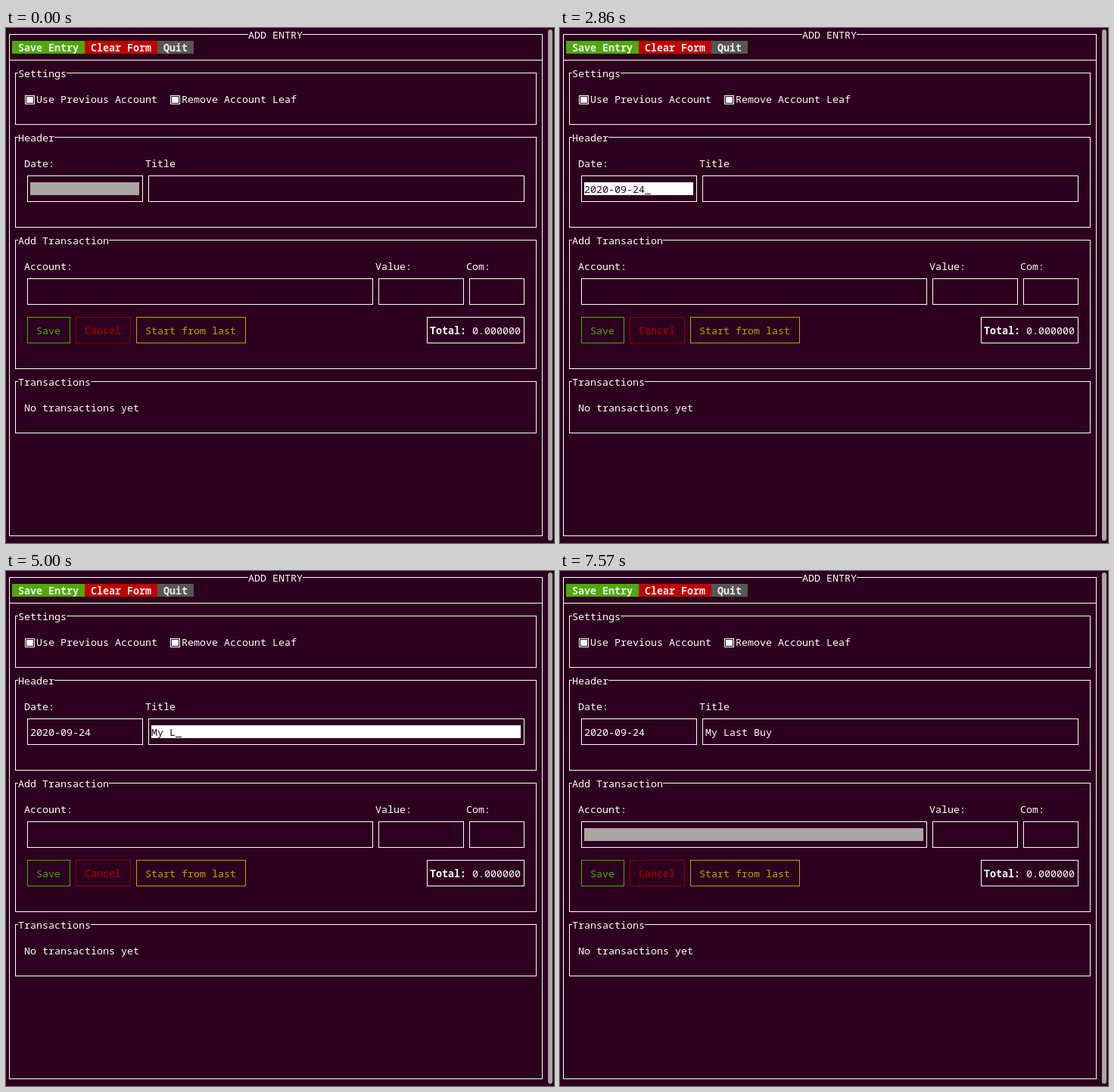
Animation, 724 px wide and 681 px high, one loop 8000 ms. Source, as an HTML page with a canvas:

```html
<!DOCTYPE html>
<html lang="en">
<head>
<meta charset="utf-8">
<title>Add entry</title>
<style>
html, body { margin: 0; width: 724px; height: 681px; overflow: hidden; background: #2c001e; }
canvas { display: block; }
</style>
</head>
<body>
<canvas id="stage" width="724" height="681"></canvas>
<script>
const ctx = document.getElementById('stage').getContext('2d');
const CW = 8, CH = 17, LOOP = 8000;
const BG = '#2c001e', WHITE = '#ffffff', GREY = '#aaa6a4';
const GREEN = '#4ea80a', RED = '#bf0000', DARK_RED = '#8b0008', YELLOW = '#c4a000';

// [time, number of characters typed]
const DATE = { text: '2020-09-24', start: 0, end: 3000, col: 4, row: 12, width: 18,
  keys: [[570, 1], [1000, 2], [1430, 3], [1710, 5], [2000, 6], [2290, 8], [2430, 9], [2860, 10]] };
const TITLE = { text: 'My Last Buy', start: 3000, end: 7570, col: 24, row: 12, width: 61,
  keys: [[4000, 1], [4290, 2], [4430, 3], [5000, 4], [5290, 5], [5430, 7], [5860, 8], [6000, 9], [6710, 10], [7000, 11]] };
const ACCOUNT = { text: '', start: 7570, end: LOOP, col: 4, row: 20, width: 56, keys: [] };

function fill(x, y, w, h, color) {
  ctx.fillStyle = color;
  ctx.fillRect(x, y, w, h);
}

function cells(col, row, n, color) {
  fill(col * CW, row * CH, n * CW, CH, color);
}

function text(str, col, row, color = WHITE, bold = false) {
  ctx.font = (bold ? 'bold ' : '') + '13.3333px "Noto Sans Mono", "DejaVu Sans Mono", monospace';
  ctx.fillStyle = color;
  ctx.fillText(str, col * CW, row * CH + 14);
}

function box(c1, r1, c2, r2, color = WHITE) {
  ctx.strokeStyle = color;
  ctx.lineWidth = 1;
  ctx.strokeRect(c1 * CW + 4.5, r1 * CH + 8.5, (c2 - c1) * CW, (r2 - r1) * CH);
}

function heading(str, col, row) {
  cells(col, row, str.length, BG);
  text(str, col, row);
}

function panel(str, r1, r2) {
  box(1, r1, 87, r2);
  heading(str, 2, r1);
}

function menuItem(str, col, color) {
  cells(col, 1, str.length + 2, color);
  text(str, col + 1, 1, '#eeeeec', true);
}

function checkbox(str, col) {
  const x = col * CW + 1, y = 5 * CH + 4;
  ctx.strokeStyle = WHITE;
  ctx.strokeRect(x + 0.5, y + 0.5, 12, 11);
  fill(x + 2, y + 2, 9, 8, WHITE);
  text(str, col + 2, 5);
}

function button(str, c1, c2, color, bold) {
  box(c1, 22, c2, 24, color);
  text(str, c1 + 2, 23, color, bold);
}

function field(f, t) {
  if (t < f.start) return;
  if (t >= f.end) {
    text(f.text, f.col, f.row);
    return;
  }
  let n = 0;
  for (const [at, count] of f.keys) if (t >= at) n = count;
  cells(f.col, f.row, f.width, n ? WHITE : GREY);
  if (n) {
    text(f.text.slice(0, n), f.col, f.row, BG);
    fill((f.col + n) * CW, f.row * CH + 15, CW, 1, BG);
  }
}

function drawForm() {
  fill(0, 0, 724, 681, BG);
  box(0, 0, 88, 39);
  heading('ADD ENTRY', 40, 0);
  menuItem('Save Entry', 1, GREEN);
  menuItem('Clear Form', 13, RED);
  menuItem('Quit', 25, '#555753');
  fill(4, 42, 705, 1, WHITE);

  panel('Settings', 3, 7);
  checkbox('Use Previous Account', 3);
  checkbox('Remove Account Leaf', 27);

  panel('Header', 8, 15);
  text('Date:', 3, 10);
  text('Title', 23, 10);
  box(3, 11, 22, 13);
  box(23, 11, 85, 13);

  panel('Add Transaction', 16, 26);
  text('Account:', 3, 18);
  text('Value:', 61, 18);
  text('Com:', 76, 18);
  box(3, 19, 60, 21);
  box(61, 19, 75, 21);
  box(76, 19, 85, 21);
  button('Save', 3, 10, GREEN);
  button('Cancel', 11, 20, DARK_RED, true);
  button('Start from last', 21, 39, YELLOW);
  box(69, 22, 85, 24);
  text('Total:', 70, 23, WHITE, true);
  text('0.000000', 77, 23);

  panel('Transactions', 27, 31);
  text('No transactions yet', 3, 29);

  ctx.fillStyle = GREY;
  ctx.beginPath();
  ctx.roundRect(716, 2, 6, 676, 3);
  ctx.fill();
}

const begin = performance.now();
function frame() {
  const t = (performance.now() - begin) % LOOP;
  drawForm();
  for (const f of [DATE, TITLE, ACCOUNT]) field(f, t);
  requestAnimationFrame(frame);
}
frame();
</script>
</body>
</html>
```
